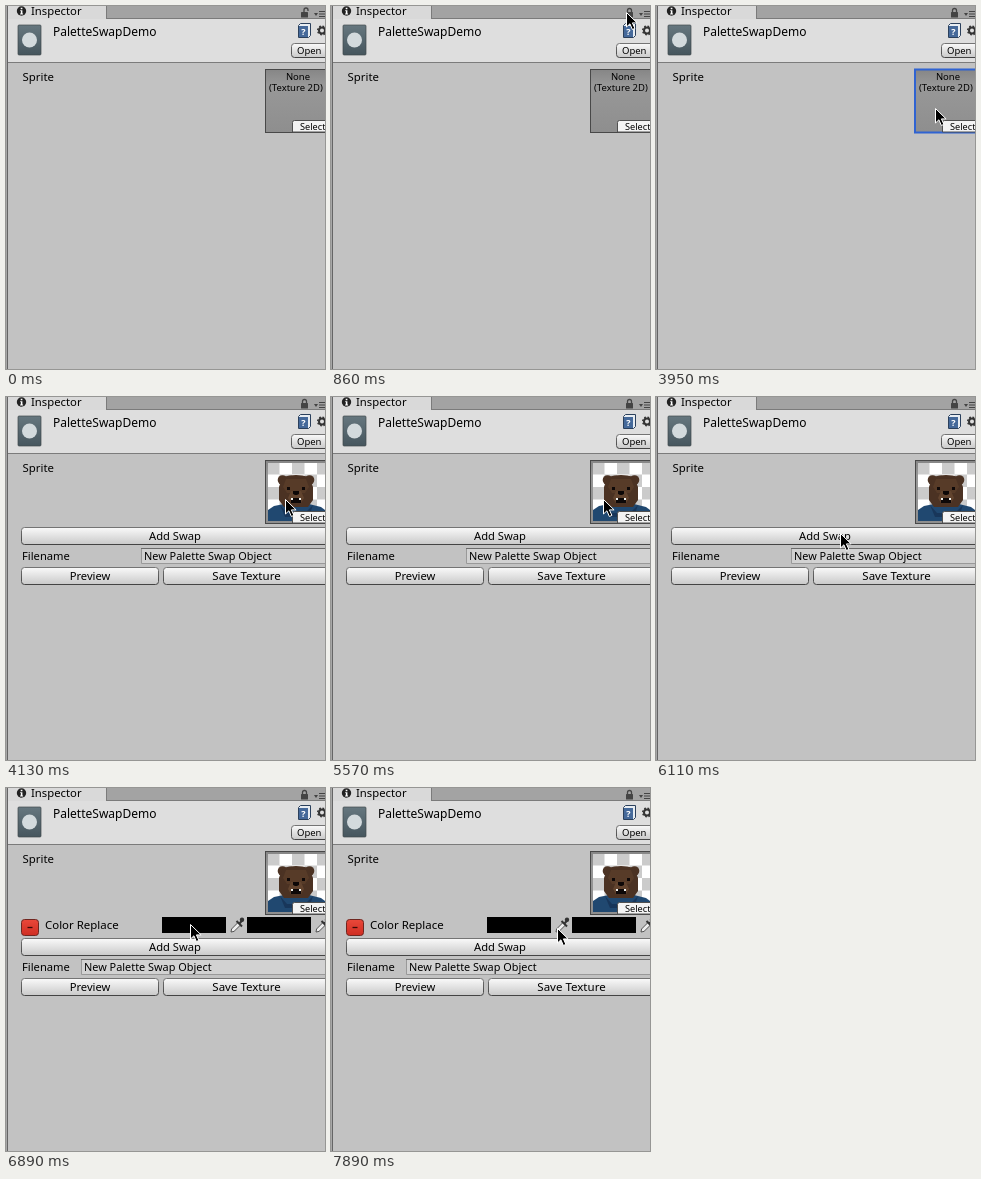
Write an HTML page that moves like this. It is 319 px wide and 363 px high and loops after 8000 ms.

```html
<!DOCTYPE html>
<html lang="en">
<head>
<meta charset="utf-8">
<title>Inspector</title>
<style>
html, body { margin: 0; width: 100%; height: 100%; overflow: hidden; background: #c2c2c2; }
svg { display: block; width: 100%; height: 100%; }
text { font-family: "Noto Sans", "Open Sans", sans-serif; font-size: 11px; fill: #000; }
.mid { text-anchor: middle; }
.small { font-size: 9.5px; }
</style>
</head>
<body>
<svg viewBox="0 0 319 363" preserveAspectRatio="none">
  <defs>
    <linearGradient id="face" x2="0" y2="1">
      <stop offset="0" stop-color="#fafafa"/><stop offset="1" stop-color="#c9c9c9"/>
    </linearGradient>
    <linearGradient id="edge" x2="0" y2="1">
      <stop offset="0" stop-color="#747474"/><stop offset="1" stop-color="#444"/>
    </linearGradient>
    <linearGradient id="well" x2="0" y2="1">
      <stop offset="0" stop-color="#868686"/><stop offset=".25" stop-color="#989898"/><stop offset="1" stop-color="#8e8e8e"/>
    </linearGradient>
    <linearGradient id="doc" x2="0" y2="1">
      <stop offset="0" stop-color="#66777f"/><stop offset="1" stop-color="#46565e"/>
    </linearGradient>
    <linearGradient id="red" x2="0" y2="1">
      <stop offset="0" stop-color="#e9483a"/><stop offset="1" stop-color="#cf2d22"/>
    </linearGradient>
    <pattern id="check" x="261" y="65" width="25" height="25" patternUnits="userSpaceOnUse">
      <path fill="#cbcbcb" d="M0 0h25v25H0z"/><path fill="#fff" d="M12.500 0H25v12.500H12.500zM0 12.500h12.500V25H0z"/>
    </pattern>
    <g id="dropper">
      <path d="M1 15l.6-3L8 5.500l2.500 2.500L4 14.400z" fill="#eee" stroke="#444" stroke-width=".9"/>
      <path d="M6.500 4l5.500 5.500M9.500 6.500l3-3.500" fill="none" stroke="#333" stroke-width="2"/>
      <circle cx="12" cy="2.800" r="2.200" fill="#333"/>
    </g>
  </defs>

  <path fill="#c2c2c2" d="M0 0h319v363H0z"/>
  <path fill="#a3a3a3" d="M101 0h218v13H101z"/>
  <path fill="#dedede" d="M2 13h317v43H2z"/>
  <path fill="#d9d9d9" d="M2 0h98v13H2z"/>
  <path stroke="#7b7b7b" d="M100.500 0v13M100 12.500h219M2 56.500h317"/>
  <path fill="#a8a8a8" d="M0 0h1v363H0z"/>
  <path fill="#656565" d="M1 0h1v363H1z"/>

  <circle cx="15.500" cy="5" r="4.700" fill="#222"/>
  <path fill="#fff" d="M14.700 1.700h1.700v1.500h-1.700zM14.200 4.200h2.200v3.400h.7v.9h-3v-.9h.7V5h-.6z"/>
  <text x="25" y="9" style="font-size:11.300px">Inspector</text>

  <rect x="295" y="6" width="7" height="5.500" rx=".6" fill="#444"/>
  <path id="shackle" fill="none" stroke="#444" stroke-width="1.300"/>
  <path fill="#444" d="M308 7h4l-2 3zM313 5h6v1h-6zm0 2.500h6v1h-6zm0 2.500h6v1h-6z"/>

  <rect x="12" y="19" width="23" height="30" rx="1" fill="url(#doc)" stroke="#41494d" stroke-width=".7"/>
  <circle cx="23.500" cy="34" r="7.500" fill="#d3dadd"/>
  <text x="47" y="30" style="font-size:12px">PaletteSwapDemo</text>

  <path d="M292.500 19.500l2-2h10v12l-2 2h-10z" fill="#e8edf2" stroke="#2b405c"/>
  <path d="M293 20h9v11h-9z" fill="#45699a"/>
  <text class="mid" x="297.500" y="29" style="font-size:9px;font-weight:700;fill:#fff">?</text>
  <circle cx="316" cy="24.500" r="3" fill="none" stroke="#333" stroke-width="2"/>
  <circle cx="316" cy="24.500" r="4.300" fill="none" stroke="#333" stroke-width="1.500" stroke-dasharray="1.700 1.680"/>
  <g class="btn" data-box="285 37 40 14"></g>
  <text class="small" x="291" y="48">Open</text>

  <text x="16.500" y="75" style="font-size:11.400px">Sprite</text>
  <rect x="259.500" y="63.500" width="64" height="63" fill="url(#well)" stroke="#484848"/>
  <g id="none">
    <text class="mid small" x="292" y="74">None</text>
    <text class="small" x="263" y="85">(Texture 2D)</text>
  </g>
  <g id="bear">
    <path fill="url(#check)" d="M262 66h57v58h-57z"/>
    <path fill="#204870" d="M262 124v-11l6-4 10-2h25l12 3 4 3v11z"/>
    <path fill="#18365a" d="M274 108l7 8h18l8-8-4 12h-24z"/>
    <g fill="#4b3223">
      <circle cx="276.500" cy="83" r="4.800"/><circle cx="303.500" cy="83" r="4.800"/>
      <path d="M277 80q13-4 26 0l4 10v13l-5 7h-24l-5-7V90z"/>
    </g>
    <path fill="#573b28" d="M280 82h20l3 8-4 6h-18l-4-6z"/>
    <path fill="#62442f" d="M285 94h10l3 7-3 5h-10l-3-5z"/>
    <path fill="#0d0808" d="M281 90h3v3h-3zM296 90h3v3h-3zM287 94h6v3l-2 1h-2l-2-1zM285 101h10v5h-10z"/>
    <path fill="#f2f2ee" d="M285 101h2v2h-2zM293 101h2v2h-2z"/>
  </g>
  <rect id="glow" x="259" y="63.500" width="66" height="63" fill="none" stroke="#2f63d2" stroke-width="2"/>
  <path fill="#f3f3f3" stroke="#505050" d="M320 114.500h-31.500q-2 0-2 2v9.500H320"/>
  <text class="small" x="294" y="124" style="font-size:9.200px">Select</text>

  <g id="swap">
    <rect x="15.500" y="131.500" width="17" height="16" rx="3" fill="url(#red)" stroke="#6f2620"/>
    <path stroke="#3a0a08" stroke-width="1.300" d="M21.500 139.500h5"/>
    <text x="39" y="141" style="font-size:11.450px">Color Replace</text>
    <path d="M156 129h64v16h-64zM241 129h64v16h-64z"/>
    <use href="#dropper" x="224" y="129"/><use href="#dropper" x="309" y="129"/>
  </g>

  <g id="form">
    <g id="add" class="btn" data-box="15 130 308 17"></g>
    <text class="mid" x="169" y="143" style="font-size:11.200px">Add Swap</text>
    <text x="16" y="163" style="font-size:11.200px">Filename</text>
    <path id="field" fill="#d2d2d2" stroke="#999"/>
    <path id="fieldTop" stroke="#6b6b6b"/>
    <text id="name" y="163" style="font-size:10.900px">New Palette Swap Object</text>
    <g class="btn" data-box="15 170 137 17"></g>
    <text class="mid" x="84" y="183" style="font-size:11.200px">Preview</text>
    <g class="btn" data-box="157 170 166 17"></g>
    <text class="mid" x="240.500" y="183" style="font-size:11.500px">Save Texture</text>
  </g>

  <path id="cursor" fill="#000" stroke="#fff" stroke-width="1" d="M.5.500v14.500l3.400-3.200 2.500 5.700 2.500-1.100-2.500-5.500h4.700z"/>
</svg>
<script>
const LOOP = 8000, STEP = 60;
const $ = id => document.getElementById(id);
const show = (id, on) => $(id).setAttribute('display', on ? 'inline' : 'none');
const set = (id, key, value) => $(id).setAttribute(key, value);

for (const g of document.querySelectorAll('.btn')) {
  const [x, y, w, h] = g.dataset.box.split(' ').map(Number);
  g.innerHTML = `<rect x="${x + .5}" y="${y + .5}" width="${w}" height="${h}" rx="3" fill="url(#face)" stroke="url(#edge)"/>`;
}

const out = p => 1 - (1 - p) ** 2;
const soft = p => p * p * (3 - 2 * p);
const linear = p => p;
const AWAY = -60;

// start, end, from x, from y, to x, to y, easing
const moves = [
  [0, 0, AWAY, AWAY, AWAY, AWAY, linear],
  [60, 860, 43, 9, 295, 6, out],
  [1400, 1460, 243, 33, 191, 61, linear],
  [1520, 1520, AWAY, AWAY, AWAY, AWAY, linear],
  [3070, 3070, 301, -10, 301, -10, linear],
  [3130, 3130, AWAY, AWAY, AWAY, AWAY, linear],
  [3310, 3590, 312, 82, 279, 102, out],
  [5570, 6110, 272, 102, 184, 136, soft],
  [7540, 7890, 186, 136, 226, 140, soft]
];

function cursorAt(t) {
  const [t0, t1, x0, y0, x1, y1, ease] = moves.findLast(m => t >= m[0]);
  const held = Math.floor((t - t0) / STEP) * STEP;
  const p = t >= t1 ? 1 : ease(held / (t1 - t0));
  return [Math.round(x0 + (x1 - x0) * p), Math.round(y0 + (y1 - y0) * p)];
}

function draw(t) {
  const filled = t >= 4130, added = t >= 6890;
  const left = added ? 75 : 135;
  set('shackle', 'd', t >= 860 ? 'M296.500 6.500V4.500q0-2 2-2t2 2v2' : 'M298 6.500V4q0-2 2-2t2 2v1');
  show('none', !filled);
  show('bear', filled);
  show('glow', t >= 3370 && !filled);
  show('swap', added);
  show('form', filled);
  set('form', 'transform', `translate(0 ${added ? 20 : 0})`);
  set('add', 'opacity', t >= 6830 && !added ? .55 : 1);
  set('field', 'd', `M${left + .5} 151.500H324v15H${left + .5}z`);
  set('fieldTop', 'd', `M${left} 151.500H324`);
  set('name', 'x', left + 3);
  set('cursor', 'transform', `translate(${cursorAt(t)})`);
}

const begin = performance.now();
function tick() {
  draw((performance.now() - begin) % LOOP);
  requestAnimationFrame(tick);
}
draw(0);
requestAnimationFrame(tick);
</script>
</body>
</html>
```
